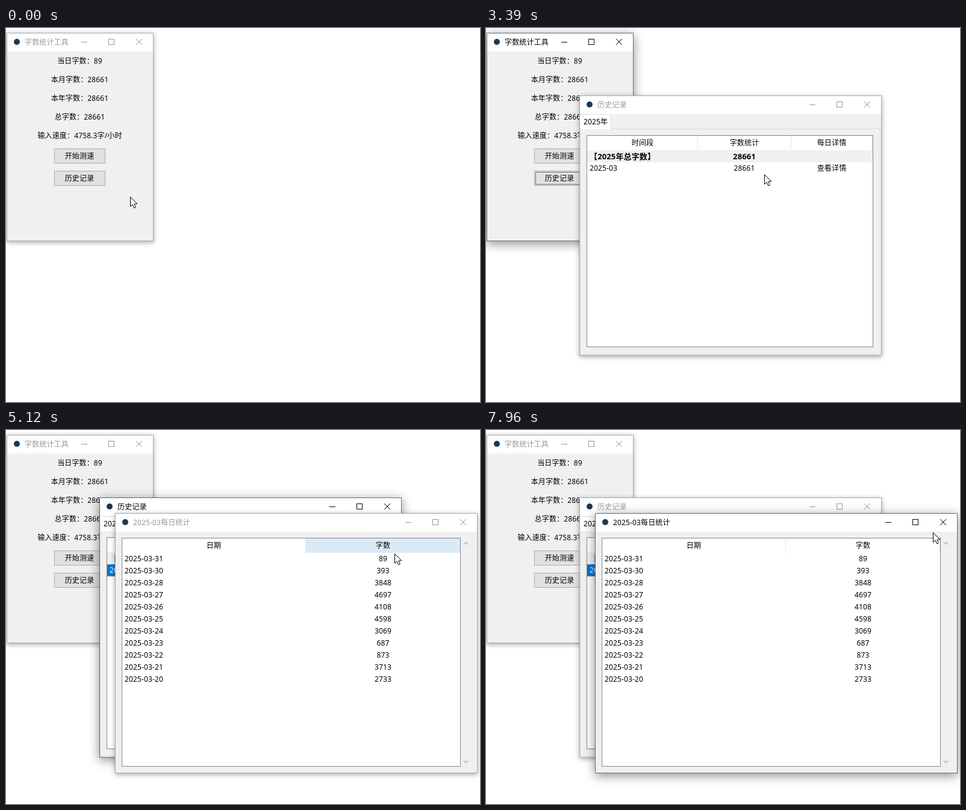
An HTML page with a canvas for the animation above (8 s loop, 787 by 621 pixels).

```html
<!DOCTYPE html>
<html lang="zh-CN">
<meta charset="utf-8">
<title>字数统计工具</title>
<style>
  html, body { margin: 0; width: 100%; height: 100%; overflow: hidden; background: #fff; }
  canvas { display: block; }
</style>
<canvas id="stage" width="787" height="621"></canvas>
<script>
const LOOP = 8000, W = 787, H = 621;
const FONT = '"Noto Sans", "Noto Sans CJK SC", sans-serif';
const stage = document.getElementById('stage').getContext('2d');
const layer = document.createElement('canvas');
layer.width = W;
layer.height = H;
const ctx = layer.getContext('2d');

// Pointer tip: time, x, y
const PATH = [
  [0, 206, 280], [50, 203, 277], [100, 200, 275], [600, 200, 275], [900, 168, 263], [1210, 128, 246],
  [2490, 128, 246], [2800, 205, 249], [3290, 390, 249], [3390, 462, 243], [3640, 560, 234],
  [3940, 560, 234], [4110, 578, 230], [4460, 644, 192], [5080, 644, 192], [5120, 645, 205],
  [5420, 656, 290], [5720, 662, 309], [5830, 662, 309], [6240, 681, 207], [6640, 758, 151],
  [6740, 760, 156], [6950, 760, 156], [7510, 738, 186], [7770, 738, 186], [7960, 742, 170], [LOOP, 742, 170]
];
const DAYS = [
  ['31', 89], ['30', 393], ['28', 3848], ['27', 4697], ['26', 4108], ['25', 4598],
  ['24', 3069], ['23', 687], ['22', 873], ['21', 3713], ['20', 2733]
];
const HISTORY_OPEN = 1760, SELECT = 3690, DAILY_OPEN = 3805, DAILY_FOCUS = 6990;

function pointerAt(t) {
  const i = PATH.findIndex(p => p[0] > t);
  const [t0, x0, y0] = PATH[i - 1], [t1, x1, y1] = PATH[i];
  const k = (t - t0) / (t1 - t0);
  return { x: x0 + (x1 - x0) * k, y: y0 + (y1 - y0) * k };
}
const inside = (p, x0, y0, x1, y1) => p.x >= x0 && p.x < x1 && p.y >= y0 && p.y < y1;

function rect(x, y, w, h, fill) {
  ctx.fillStyle = fill;
  ctx.fillRect(x, y, w, h);
}
function box(x, y, w, h, border, fill) {
  rect(x, y, w, h, border);
  rect(x + 1, y + 1, w - 2, h - 2, fill);
}
function text(str, x, y, { color = '#000', align = 'left', font = '12px' } = {}) {
  ctx.font = `${font} ${FONT}`;
  ctx.letterSpacing = '0.14px';
  ctx.textAlign = align;
  ctx.fillStyle = color;
  ctx.fillText(str, x, y);
}
const centered = (str, x, y, style) => text(str, x, y, { align: 'center', ...style });

function line(color, ...points) {
  ctx.strokeStyle = color;
  ctx.lineWidth = 1;
  ctx.beginPath();
  points.forEach(([x, y]) => ctx.lineTo(x, y));
  ctx.stroke();
}

function frame(x, y, w, h, title, active, closeFill) {
  ctx.save();
  ctx.shadowColor = active ? 'rgba(0,0,0,.45)' : 'rgba(0,0,0,.36)';
  ctx.shadowBlur = active ? 17 : 8;
  ctx.shadowOffsetY = active ? 4 : 2;
  rect(x, y, w, h, active ? '#6b6b6b' : '#aaa');
  ctx.restore();
  rect(x + 1, y + 1, w - 2, 30, '#fff');
  rect(x + 1, y + 31, w - 2, h - 32, '#f0f0f0');
  ctx.fillStyle = '#1c3850';
  ctx.beginPath();
  ctx.arc(x + 17, y + 15, 5, 0, 7);
  ctx.fill();

  const ink = active ? '#000' : '#999';
  const right = x + w - 1, mid = y + 15;
  text(title, x + 30, y + 20, { color: ink });
  rect(right - 119, mid, 10, 1, ink);
  box(right - 74, mid - 5, 10, 10, ink, '#fff');
  if (closeFill) rect(right - 45, y + 1, 45, 29, closeFill);
  const cross = closeFill ? '#fff' : ink;
  line(cross, [right - 28, mid - 5], [right - 18, mid + 5]);
  line(cross, [right - 18, mid - 5], [right - 28, mid + 5]);
}

function button(label, y, { fill = '#e1e1e1', border = '#adadad', focus = false } = {}) {
  box(80, y, 85, 25, border, fill);
  if (focus) {
    ctx.strokeStyle = '#000';
    ctx.setLineDash([1, 1]);
    ctx.strokeRect(82.5, y + 2.5, 80, 20);
    ctx.setLineDash([]);
  }
  centered(label, 122, y + 17);
}

function drawMain(t, p) {
  frame(1, 8, 244, 346, '字数统计工具', t >= 1610 && t < SELECT);
  ['当日字数：89', '本月字数：28661', '本年字数：28661', '总字数：28661', '输入速度：4758.3字/小时']
    .forEach((label, i) => centered(label, 122.5, 59 + 31 * i));
  button('开始测速', 200);
  const focus = t >= 1610 && t < SELECT;
  const hover = inside(p, 80, 237, t > HISTORY_OPEN ? 155 : 165, 262);
  if (t >= 1610 && t < 1780) button('历史记录', 237, { fill: '#cce4f7', border: '#005499', focus });
  else if (hover) button('历史记录', 237, { fill: '#e5f1fb', border: '#0078d7', focus });
  else button('历史记录', 237, { focus });
}

function drawHistory(t) {
  frame(155, 112, 502, 432, '历史记录', t >= SELECT && t < DAILY_FOCUS);
  box(156, 167, 499, 375, '#dcdcdc', '#f0f0f0');
  rect(156, 143, 52, 25, '#dcdcdc');
  rect(156, 144, 51, 24, '#fff');
  text('2025年', 162, 160);
  box(167, 178, 476, 352, '#828790', '#fff');
  [351, 506, 641].forEach(x => rect(x, 179, 1, 24, '#e5e5e5'));
  centered('时间段', 260, 195);
  centered('字数统计', 429, 195);
  centered('每日详情', 574, 195);

  rect(168, 203, 474, 20, '#f0f0f0');
  const font = 'bold 13px';
  text('【2025年总字数】', 172, 217.5, { font });
  centered('28661', 429, 217.5, { font });
  const selected = t >= SELECT;
  if (selected) rect(168, 223, 474, 20, '#0078d7');
  const color = selected ? '#fff' : '#000';
  text('2025-03', 172, 237, { color });
  centered('28661', 429, 237, { color });
  centered('查看详情', 574, 237, { color });
}

function drawDaily(t, p) {
  const onClose = inside(p, 737, 139, 782, 169);
  const pressed = t >= DAILY_FOCUS;
  frame(181, 138, 602, 432, '2025-03每日统计', pressed, onClose && (pressed ? '#f1707a' : '#e81123'));
  box(192, 179, 563, 380, '#828790', '#fff');
  rect(497, 180, 1, 24, '#e5e5e5');
  rect(753, 180, 1, 24, '#e5e5e5');
  if (inside(p, 498, 180, 754, 206)) rect(497, 180, 257, 24, '#d9ebf9');
  centered('日期', 345, 196);
  centered('字数', 626, 196);
  DAYS.forEach(([day, count], i) => {
    text(`2025-03-${day}`, 197, 218 + 20 * i);
    centered(count, 626, 218 + 20 * i);
  });
  for (const [y, d] of [[188, 1], [551, -1]]) {
    for (const o of [0, 1]) line('#a8a8a8', [760, y + d * (1.5 + o)], [763.5, y + d * (o - 2)], [767, y + d * (1.5 + o)]);
  }
}

// Windows fade in while growing from 95 % about their centre.
function show(t, opened, cx, cy, draw) {
  const k = Math.min(1, (t - opened) / 260);
  if (k <= 0) return;
  const alpha = 1 - (1 - k) ** 2, scale = 0.95 + 0.05 * alpha;
  ctx.clearRect(0, 0, W, H);
  draw();
  stage.save();
  stage.globalAlpha = alpha;
  stage.translate(cx, cy);
  stage.scale(scale, scale);
  stage.drawImage(layer, -cx, -cy);
  stage.restore();
}

function drawPointer({ x, y }) {
  stage.save();
  stage.translate(Math.round(x) + 0.5, Math.round(y) + 0.5);
  stage.beginPath();
  [[0, 0], [0, 16], [3.6, 12.6], [6.2, 18.4], [8.8, 17.3], [6.4, 11.6], [11.3, 11.4]]
    .forEach(q => stage.lineTo(...q));
  stage.closePath();
  stage.fillStyle = '#fff';
  stage.fill();
  stage.strokeStyle = '#000';
  stage.stroke();
  stage.restore();
}

function render(now) {
  const t = now % LOOP, p = pointerAt(t);
  stage.fillStyle = '#fff';
  stage.fillRect(0, 0, W, H);
  show(t, -LOOP, 123, 181, () => drawMain(t, p));
  show(t, HISTORY_OPEN, 406, 328, () => drawHistory(t));
  show(t, DAILY_OPEN, 482, 354, () => drawDaily(t, p));
  drawPointer(p);
  requestAnimationFrame(render);
}
requestAnimationFrame(render);
</script>
</html>
```
